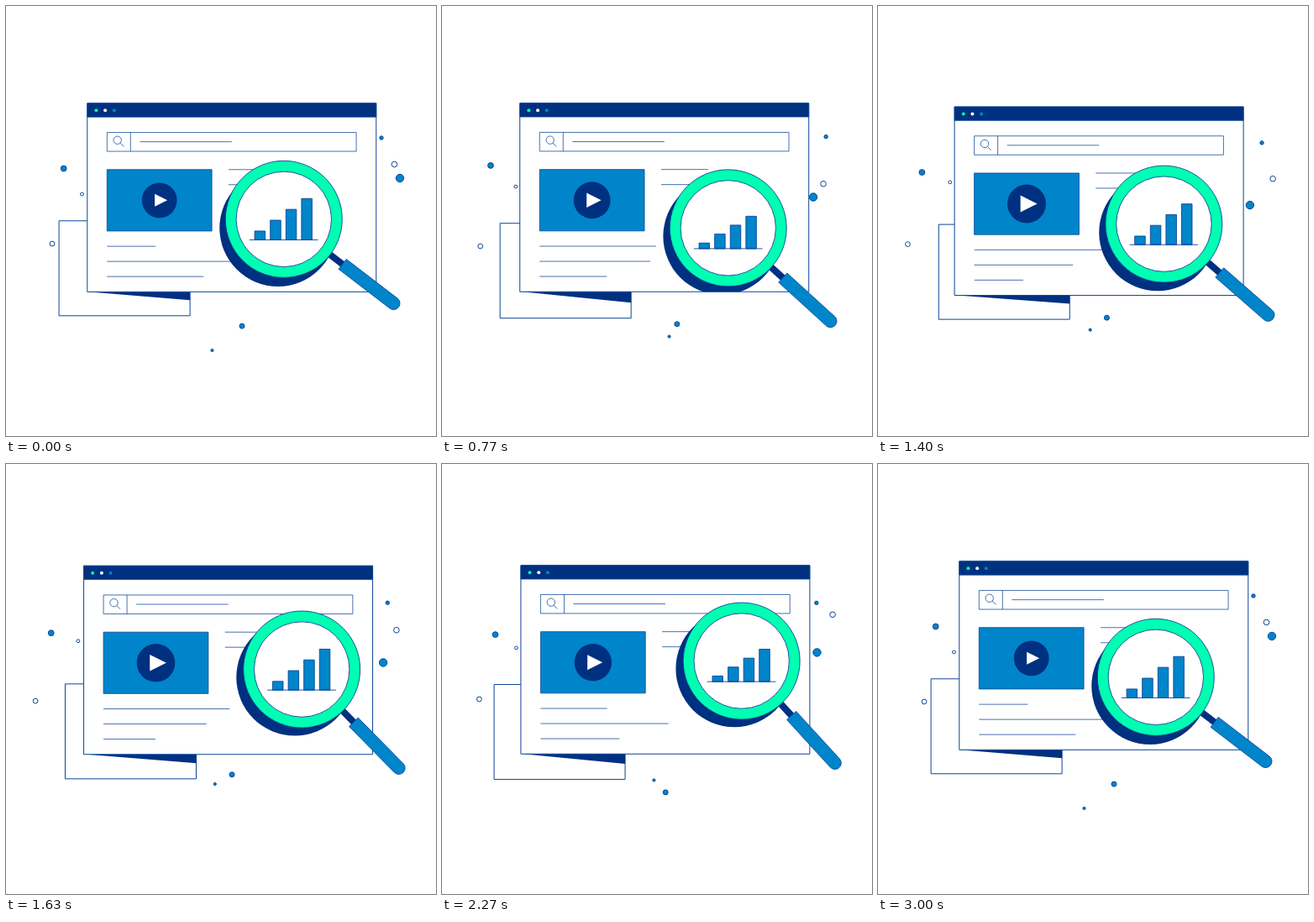
Write an HTML page with a canvas that moves like this. It is 512 px wide and 512 px high and loops after 3030 ms.

```html
<!DOCTYPE html>
<html lang="en">
<head>
<meta charset="utf-8">
<title>Search analytics</title>
<style>
html, body { margin: 0; width: 100%; height: 100%; overflow: hidden; background: #fff; }
canvas { display: block; width: 512px; height: 512px; }
</style>
</head>
<body>
<canvas id="stage" width="512" height="512"></canvas>
<script>
const ctx = document.getElementById('stage').getContext('2d');
const NAVY = '#003080', BLUE = '#0085ca', GREEN = '#00ffb2', WHITE = '#fff', LINE = '#0a4396';
const LOOP = 3030, TAU = Math.PI * 2;

// Smooth periodic motion around a mean; each pair weighs the cosine and sine of one harmonic.
// The phase p runs from 0 to 1 over the loop.
const swing = (mean, ...harmonics) => p => harmonics.reduce((sum, [c, s], i) => {
  const a = TAU * p * (i + 1);
  return sum + c * Math.cos(a) + s * Math.sin(a);
}, mean);

const win = {
  x: swing(-2.97, [2.54, -0.5], [0.43, 1.32]),
  y: swing(2.55, [-2.4, -2.6])
};
const card = {
  x: swing(66.5, [-4.3, 3.4], [0.9, 0]),
  y: swing(259.5, [-2.5, -2], [-1.2, 0.8])
};
const lens = {
  x: swing(343.5, [-7.15, -10], [-5.55, 4.6], [0, -1.8]),
  y: swing(251.3, [0.25, 15.9], [2.3, -6.3], [0, 1]),
  tilt: swing(42.6, [-2.66, -3.3], [-2.47, 2], [0, -0.6])
};
const textLines = [
  swing(109, [-51, 28]),
  swing(142, [23, -9.5]),
  swing(87, [28, -6])
];
const growth = swing(0.5, [0, -0.1], [0.5, -0.14], [0, -0.1]);

const dot = (r, fill, x, y) => ({ r, fill, x, y });
const dots = [
  dot(3.4, BLUE, swing(60.7, [8, -2.5]), swing(196.5, [-3, -6.7])),
  dot(1.9, WHITE, swing(88.1, [2.4, -0.3]), swing(217, [7, -1.7])),
  dot(2.9, WHITE, swing(45, [10, 1]), swing(283, [0, 3])),
  dot(2.2, BLUE, swing(451.5, [-4.5, 5.5]), swing(160.5, [-3.5, -5])),
  dot(3.3, WHITE, swing(462.2, [-2.9, -5.6], [3.2, -8.2]), swing(195.5, [-7, 16])),
  dot(4.7, BLUE, swing(451.1, [11.5, -1.8], [6.4, 6]), swing(223.5, [-16, 1], [-2.5, 0])),
  dot(3, BLUE, swing(274.5, [5, 7], [1.5, 0]), swing(380, [5.6, -5.9], [-4.5, -4.9])),
  dot(1.6, BLUE, swing(254.7, [-2.4, 9], [-6.8, 0]), swing(391, [13, 9], [6, 0]))
];

function paint(fill, width) {
  if (fill) { ctx.fillStyle = fill; ctx.fill(); }
  if (width) { ctx.lineWidth = width; ctx.strokeStyle = LINE; ctx.stroke(); }
}
function rect(x, y, w, h, fill, width) {
  ctx.beginPath();
  ctx.rect(x, y, w, h);
  paint(fill, width);
}
function circle(x, y, r, fill, width) {
  ctx.beginPath();
  ctx.arc(x, y, r, 0, TAU);
  paint(fill, width);
}
function line(x1, y1, x2, y2, width = 0.75) {
  ctx.beginPath();
  ctx.moveTo(x1, y1);
  ctx.lineTo(x2, y2);
  paint(null, width);
}
function polygon(points, fill) {
  ctx.beginPath();
  points.forEach(([x, y]) => ctx.lineTo(x, y));
  ctx.closePath();
  paint(fill);
}

function drawCard(p) {
  const x = card.x(p), y = card.y(p), left = 97 + win.x(p), base = 340 + win.y(p);
  rect(x, y, 156, 113, WHITE, 1);
  polygon([[left, base], [x + 156, base], [x + 156, y + 94.5]], NAVY);
}

// The button pulses three times per loop.
function drawPlay(p) {
  const k = (1 - Math.cos(TAU * p * 3)) / 2;
  const x = 182.7, y = 231.2, s = 15 + 5.5 * k;
  circle(x, y, 20.9 + 2.3 * k, NAVY);
  polygon([[x - s * 0.37, y - s / 2], [x + s * 0.63, y], [x - s * 0.37, y + s / 2]], WHITE);
}

function drawWindow(p) {
  ctx.save();
  ctx.translate(win.x(p), win.y(p));
  rect(96.8, 115.7, 344, 224.5, WHITE, 1);
  rect(96.8, 115.7, 344, 16.3, NAVY, 0.8);
  [GREEN, WHITE, BLUE].forEach((c, i) => circle(107.4 + i * 10.7, 124.2, 2, c));

  rect(120.3, 150.4, 296.8, 22.5, WHITE, 0.75);
  line(148.3, 150.4, 148.3, 172.9);
  circle(132.7, 159.6, 4.7, null, 0.75);
  line(136.1, 163, 140.4, 167.3);
  line(159.3, 161.5, 268.8, 161.5);

  rect(120.3, 194.6, 124.8, 73.2, BLUE, 0.8);
  drawPlay(p);
  textLines.forEach((len, i) => line(120.3, 286 + i * 18, 120.3 + len(p), 286 + i * 18));
  line(265, 194.6, 321, 194.6);
  line(265, 212.6, 335, 212.6);
  ctx.restore();
}

function drawHandle() {
  rect(67, -4, 23, 8, NAVY);
  ctx.beginPath();
  ctx.moveTo(88, -7.5);
  ctx.lineTo(164.7, -7.5);
  ctx.arc(164.7, 0, 7.5, -Math.PI / 2, Math.PI / 2);
  ctx.lineTo(88, 7.5);
  ctx.closePath();
  paint(BLUE, 0.8);
}

function drawChart(p) {
  const k = growth(p);
  for (let i = 0; i < 4; i++) {
    const h = 6.7 + i * 10.6 + (3.8 + i * 2.3) * k;
    rect(-34.7 + i * 18.6, 24.6 - h, 12.5, h, BLUE, 0.9);
  }
  line(-41, 24.6, 40.8, 24.6, 0.9);
}

function drawLens(p) {
  const x = lens.x(p), y = lens.y(p), angle = lens.tilt(p) * Math.PI / 180;
  const shade = angle + 1.5;

  // The shadow falls on the window only.
  ctx.save();
  ctx.beginPath();
  ctx.rect(96.8 + win.x(p), 115.7 + win.y(p), 344, 224.5);
  ctx.clip();
  circle(x + 12.6 * Math.cos(shade), y + 12.6 * Math.sin(shade), 69.6, NAVY);
  ctx.restore();

  ctx.save();
  ctx.translate(x, y);
  ctx.rotate(angle);
  drawHandle();
  ctx.rotate(-angle);
  circle(0, 0, 69.5, GREEN, 0.9);
  circle(0, 0, 56.7, WHITE, 0.9);
  drawChart(p);
  ctx.restore();
}

function draw(p) {
  ctx.fillStyle = WHITE;
  ctx.fillRect(0, 0, 512, 512);
  drawCard(p);
  drawWindow(p);
  drawLens(p);
  dots.forEach(d => circle(d.x(p), d.y(p), d.r, d.fill, 1));
}

// 30 steps a second; the last step of the loop repeats the first pose.
const start = performance.now();
function tick() {
  const ms = (performance.now() - start) % LOOP;
  draw(Math.floor((ms + 4) * 0.03) % 90 / 90);
  requestAnimationFrame(tick);
}
tick();
</script>
</body>
</html>
```
